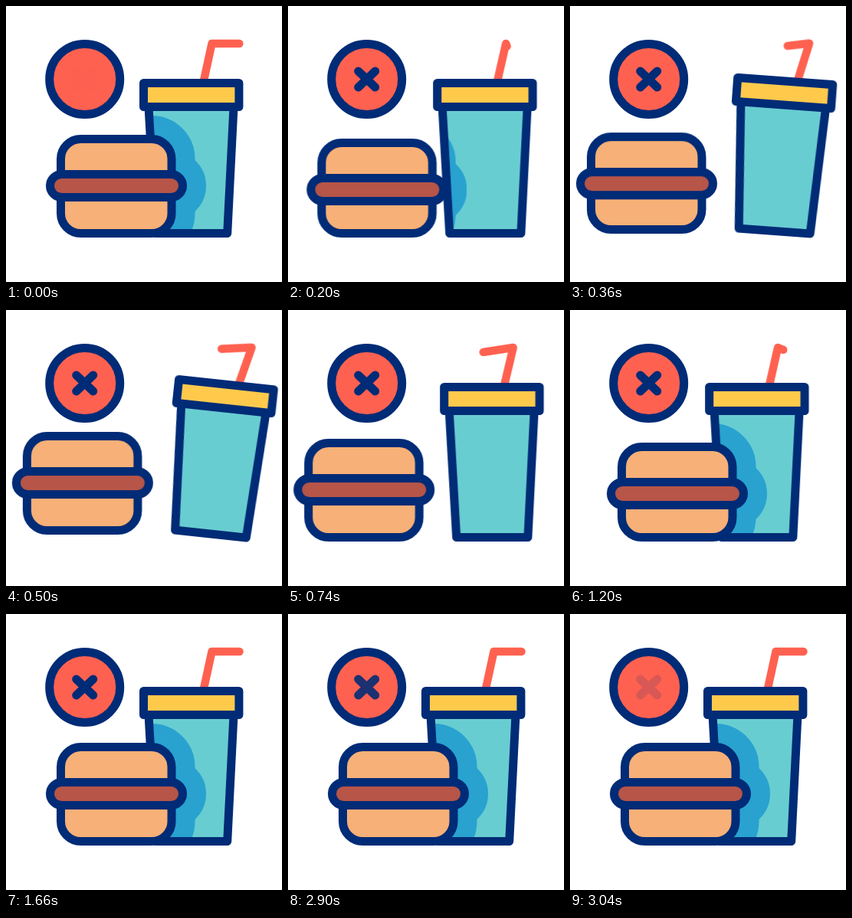
An HTML page for the animation above (3.6 s loop, 360 by 360 pixels).

```html
<!DOCTYPE html>
<html lang="en">
<head>
<meta charset="utf-8">
<title>Burger and drink</title>
<style>
html, body { margin: 0; width: 100%; height: 100%; overflow: hidden; background: #fff; }
svg { display: block; width: 100vw; height: 100vh; }

.line { stroke: #002b76; stroke-width: 11; stroke-linejoin: round; stroke-linecap: round; }
.shade { fill: #29a2d0; stroke: #29a2d0; stroke-width: 61; stroke-linejoin: round; }
.bun { fill: #f7b077; }
.meat { fill: #b65548; }

.cross, .slide, .tilt, .straw, .burger, .top, .patty, .base {
  animation: 3600ms ease-in-out infinite;
}
.cross { animation-name: cross; animation-timing-function: linear; }
.slide { animation-name: slide; }
.tilt { animation-name: tilt; transform-origin: 241.5px 200px; }
.straw { animation-name: straw; animation-timing-function: linear; }
.burger { animation-name: burger; }
.top { animation-name: top; }
.patty { animation-name: patty; }
.base { animation-name: base; }

@keyframes cross {
  0% { opacity: 0; }
  5%, 80% { opacity: 1; }
  84.4%, 99.9% { opacity: .15; }
  100% { opacity: 0; }
}
@keyframes slide {
  0%, 35.28%, 100% { transform: translateX(0); }
  9.7%, 26.1% { transform: translateX(24.2px); }
}
@keyframes burger {
  0%, 35.28%, 100% { transform: translateX(0); }
  9.7% { transform: translateX(-44px); }
  26.1% { transform: translateX(-45px); }
}
@keyframes tilt {
  0%, 6.1%, 19.44%, 100% { transform: translate(0, 0) rotate(0deg); }
  12.78% { transform: translate(11.6px, -4.2px) rotate(6.5deg); }
}
@keyframes straw {
  0%, 37.8%, 100% { d: path("M256.5 104L268.5 49L304.5 49"); }
  5.56%, 32.5% { d: path("M256.5 104L269 49L270.5 52.5"); }
  11.7%, 27.3% { d: path("M256.5 104L269.5 49L230.5 55"); }
}
@keyframes top {
  0%, 20%, 22.2%, 36.1%, 100% { transform: translateY(0); }
  5.56%, 33.3% { transform: translateY(5px); }
  13.89% { transform: translateY(-9px); }
  27.22% { transform: translateY(-21px); }
}
@keyframes patty {
  0%, 20%, 22.2%, 36.1%, 100% { transform: translateY(0); }
  5.56%, 33.3% { transform: translateY(5px); }
  13.89%, 27.22% { transform: translateY(-9px); }
}
@keyframes base {
  0%, 20%, 22.2%, 36.1%, 100% { d: path("M71.5 249.5V270.5A26 26 0 0 0 97.5 296.5H190A26 26 0 0 0 216 270.5V249.5Z"); }
  5.56%, 33.3% { d: path("M71.5 254.5V270.5A26 26 0 0 0 97.5 296.5H190A26 26 0 0 0 216 270.5V254.5Z"); }
  13.89% { d: path("M71.5 240.5V261.5A26 26 0 0 0 97.5 287.5H190A26 26 0 0 0 216 261.5V240.5Z"); }
  27.22% { d: path("M71.5 252.5V266.5A26 26 0 0 0 97.5 291.5H190A26 26 0 0 0 216 266.5V252.5Z"); }
}
</style>
</head>
<body>
<svg viewBox="0 0 360 360">
  <defs>
    <clipPath id="inside">
      <path class="slide" d="M189.5 131.5H293L285 296.5H199.5Z"/>
    </clipPath>
  </defs>

  <circle class="line" cx="102.7" cy="95.5" r="46" fill="#ff6150"/>
  <path class="line cross" d="M91.7 85L113.7 106M113.7 85L91.7 106" fill="none"/>

  <g class="slide"><g class="tilt">
    <path class="straw" d="M256.5 104L268.5 49L304.5 49" fill="none" stroke="#ff6150"
      stroke-width="10.5" stroke-linecap="round" stroke-linejoin="round"/>
    <path d="M186 131.5H297L288.7 296.5H195.5Z" fill="#68cdd1"/>
  </g></g>

  <g clip-path="url(#inside)">
    <g class="burger shade">
      <path class="top" d="M71.5 219.5V199.5A26 26 0 0 1 97.5 173.5H190A26 26 0 0 1 216 199.5V219.5Z"/>
      <path class="base" d="M71.5 249.5V270.5A26 26 0 0 0 97.5 296.5H190A26 26 0 0 0 216 270.5V249.5Z"/>
      <rect class="patty" x="57.5" y="219.5" width="173" height="30" rx="15"/>
    </g>
  </g>

  <g class="slide"><g class="tilt">
    <path class="line" d="M186 131.5H297L288.7 296.5H195.5Z" fill="none"/>
    <rect class="line" x="179.5" y="100.5" width="124.4" height="31" fill="#ffca4c"/>
  </g></g>

  <g class="burger">
    <path class="line bun base" d="M71.5 249.5V270.5A26 26 0 0 0 97.5 296.5H190A26 26 0 0 0 216 270.5V249.5Z"/>
    <path class="line bun top" d="M71.5 219.5V199.5A26 26 0 0 1 97.5 173.5H190A26 26 0 0 1 216 199.5V219.5Z"/>
    <rect class="line meat patty" x="57.5" y="219.5" width="173" height="30" rx="15"/>
  </g>
</svg>
</body>
</html>
```
